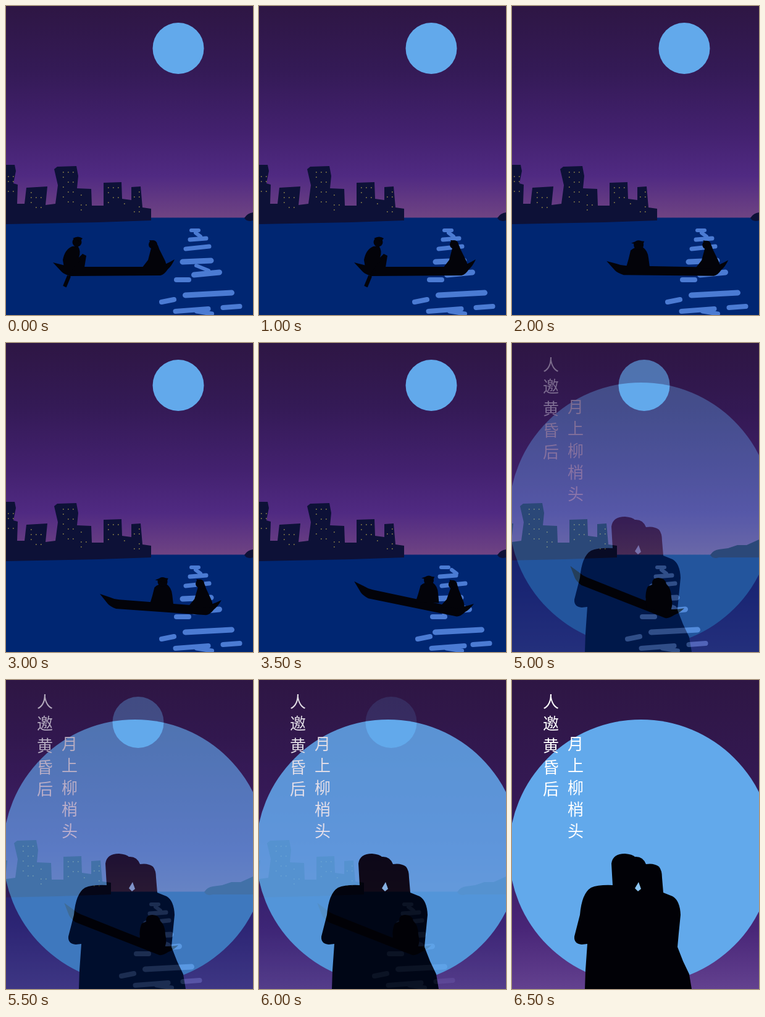
An HTML page that plays this animation: 400 px wide and 500 px high, repeating every 7300 ms.

```html
<!DOCTYPE html>
<html lang="zh">
<head>
<meta charset="utf-8">
<style>
  html, body { margin: 0; height: 100%; overflow: hidden; background: #2e1746; }
  svg { display: block; width: 100vw; height: 100vh; }
  text { font: 26px "Noto Sans CJK SC", "Noto Sans CJK", sans-serif; fill: #fff; text-anchor: middle; }
</style>
</head>
<body>
<svg viewBox="0 0 400 500">
  <defs>
    <linearGradient id="dusk" x2="0" y2="1">
      <stop offset="0" stop-color="#2e1644"/>
      <stop offset=".3" stop-color="#341a56"/>
      <stop offset=".6" stop-color="#43216f"/>
      <stop offset=".8" stop-color="#502a82"/>
      <stop offset="1" stop-color="#704483"/>
    </linearGradient>
    <linearGradient id="night" x2="0" y2="1">
      <stop offset="0" stop-color="#2e1644"/>
      <stop offset=".5" stop-color="#371a5a"/>
      <stop offset=".8" stop-color="#482577"/>
      <stop offset="1" stop-color="#63418f"/>
    </linearGradient>
  </defs>

  <g id="river">
    <rect width="480" height="344" fill="url(#dusk)"/>
    <circle cx="279" cy="68.5" r="41.5" fill="#62a9eb"/>
    <rect y="342.5" width="480" height="158" fill="#002672"/>
    <g fill="#0d1137">
      <path d="M0 257H14L16 267 12 287 19 289 18 320H30L33 294 50 293 67 292 64 322 80 320 84 290 78 264 83 260 114 259 117 275 115 295 138 296 139 323H158V286L187 285 188 312 203 314V293L218 292 221 326 235 328V347L150 350 0 353Z"/>
      <path d="M386 343Q391 335 400 334L415 332 430 327 445 327 465 318 480 315V347H400Q390 350 386 343Z"/>
    </g>
    <g id="windows" fill="#777046"/>
    <g id="glints" stroke="#4b7bd3" stroke-linecap="round"/>
    <g id="boat" fill="#030309">
      <path d="M-98-10L-82-6Q-74-3-66-3H71Q84-6 99-15Q94-4 88 1Q82 10 76 11L-70 12Q-80 9-84 5Z"/>
      <g id="rower">
        <path d="M-80-2L-82-14Q-79-31-67-36L-58-37Q-52-29-56-18L-50-24-44-21-47-2Z"/>
        <circle cx="-59" cy="-43" r="7.5"/>
        <path d="M-66-49Q-57-54-50-49L-54-44Z"/>
        <path d="M-52-20L-71 12-79 29" fill="none" stroke="#030309" stroke-width="3"/>
        <path d="M-72 12L-79 29" stroke="#030309" stroke-width="6"/>
      </g>
      <g id="man">
        <path d="M-18-1Q-14-14-11-28Q-4-35 8-34Q17-28 18-16L20-1Z"/>
        <ellipse cx="2" cy="-37" rx="8" ry="7.5"/>
        <path d="M-10-40L0-44 11-43 8-36Z"/>
      </g>
      <g id="woman">
        <path d="M-20-1L-10-14-5-33Q1-42 8-32L16-16Q20-9 20-1Z"/>
        <circle cx="-2" cy="-39" r="7"/>
        <path d="M-8-46Q4-47 8-32L0-30Z"/>
      </g>
    </g>
    <path id="embrace" fill="#030309" d="M283 430Q279 405 285 394L292 391Q291 380 302 380Q313 380 315 390Q323 397 323 412Q327 426 320 436Z"/>
  </g>

  <g id="finale">
    <rect width="400" height="500" fill="url(#night)"/>
    <circle cx="209" cy="278" r="214" fill="#62a9eb"/>
    <path fill="#010106" d="M118 500L119 470 122 427 113 428Q100 427 101 415L110 380Q113 345 128 336Q140 331 163 332L162 315 161 297Q163 281 183 281Q195 282 199 286Q212 285 217 298Q230 296 238 302Q243 308 243 320L245 344 260 350Q272 357 273 380L270 410 268 432 277 455 287 476 291 500Z"/>
    <path fill="#8bc4f2" d="M199 337L205 327 209 338 204 342Z"/>
    <g id="poem"/>
  </g>
</svg>
<script>
const $ = id => document.getElementById(id);
const STEP = 500, LOOP = 7300;

function add(parent, tag, attributes, content = '') {
  const node = document.createElementNS('http://www.w3.org/2000/svg', tag);
  for (const name in attributes) node.setAttribute(name, attributes[name]);
  node.textContent = content;
  $(parent).append(node);
  return node;
}

// Lit windows: left, top, columns, rows
[[3, 275, 2, 4], [40, 301, 3, 4], [92, 268, 3, 7], [121, 305, 2, 5],
 [165, 293, 3, 4], [191, 319, 2, 2], [207, 300, 2, 5]].forEach(([left, top, columns, rows], b) => {
  for (let i = 0; i < columns * rows; i++) {
    if (Math.sin(i * 7.3 + b * 3.1) < -.2) continue;
    add('windows', 'rect', {
      x: left + i % columns * 8, y: top + Math.floor(i / columns) * 8, width: 1.6, height: 2
    });
  }
});

// Moonlight on the water: centre x, y, length, thickness, slope
const glints = [
  [306, 363, 18, 6, 0], [311, 370, 14, 6, 3], [311, 377, 33, 7, -1],
  [310, 391, 45, 7, -2], [309, 413, 55, 9, -1], [318, 424, 26, 6, 4],
  [325, 433, 50, 9, -2], [286, 443, 28, 8, 0], [328, 466, 84, 9, -2],
  [262, 477, 28, 8, -2], [365, 487, 35, 8, -1], [301, 492, 61, 8, -2], [321, 496, 32, 7, 2]
].map(([x, y, length, width, slope]) => {
  const half = (length - width) / 2;
  return add('glints', 'path', {
    d: `M${x - half} ${y - slope}L${x + half} ${y + slope}`, 'stroke-width': width
  });
});

[['人邀黄昏后', 63, 45], ['月上柳梢头', 103, 113]].forEach(([line, x, y]) =>
  [...line].forEach((char, i) => add('poem', 'text', { x, y: y + i * 35.3 }, char)));

// Boat x, y, tilt; the man's place along the boat once he leaves the oar
const poses = [
  [174, 425, 0], [210, 425, 0], [252, 425, 0], [252, 425, 0],
  [251, 424.5, 1, -48], [250, 424, 2.8, -24], [249, 423.4, 4.4, 2],
  [248, 416, 12, 24], [246.6, 406.5, 21.8, 40], [246.6, 406.5, 21.8]
];
const fades = [.36, .63, .85, 1];

const show = (id, visible) => $(id).setAttribute('display', visible ? 'inline' : 'none');
const move = (id, value) => $(id).setAttribute('transform', value);

function draw(step) {
  const [x, y, tilt, manX] = poses[Math.min(step, 9)];
  const together = step >= 9, fading = step >= 10;
  move('river', `translate(${fading ? -65 : 0})`);
  move('boat', `translate(${x} ${y}) rotate(${tilt})`);
  show('rower', step < 4);
  show('man', manX !== undefined);
  move('man', `translate(${manX || 0}) rotate(${-tilt * .8})`);
  show('woman', !together);
  move('woman', `translate(66) rotate(${-tilt * .6})`);
  show('embrace', together);

  const ripple = [1, 3, 5, 7, 8].includes(step);
  glints.forEach((glint, i) =>
    glint.setAttribute('transform', `translate(${ripple ? (i % 2 ? 5 : -5) : 0})`));

  show('finale', fading);
  $('finale').setAttribute('opacity', fading ? fades[step - 10] : 0);
}

function tick() {
  draw(Math.min(13, Math.floor(performance.now() % LOOP / STEP)));
  requestAnimationFrame(tick);
}
tick();
</script>
</body>
</html>
```
